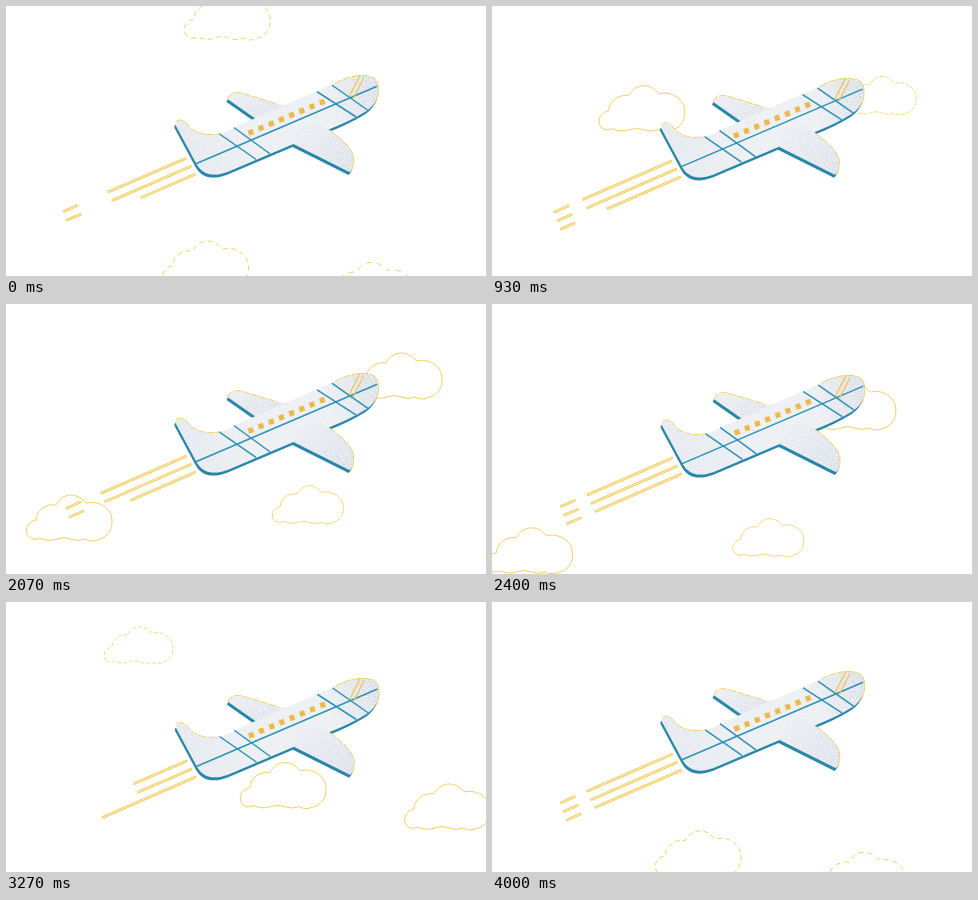
Recreate the animation shown at these times as an HTML page. Size 480 px wide and 270 px high, loop 4.07 s.

```html
<!DOCTYPE html>
<html lang="en">
<head>
<meta charset="utf-8">
<title>Plane among clouds</title>
<style>
  html, body { margin: 0; width: 100%; height: 100%; overflow: hidden; background: #fff; }
  svg { display: block; width: 100vw; height: 100vh; }
  path { stroke-linecap: round; stroke-linejoin: round; }
  #clouds path { fill: #fff; stroke: #f4cf62; stroke-linecap: butt; }
  #trail { fill: none; stroke: #f2ca58; stroke-width: 2.7; }
  #glint { fill: none; stroke: #fdf0c4; stroke-width: 1; }
  .edge { fill: #2a86a8; }
  .skin { fill: #f0f2f5; }
  .rim { fill: none; stroke: #f2cc63; stroke-width: .9; stroke-dasharray: 7 2; }
  .stripe { fill: none; stroke: #2f92b5; stroke-width: 1.5; }
  .pane { fill: none; stroke: #efc555; stroke-width: 1.3; }
  #windows { fill: #e9bb4b; }
</style>
</head>
<body>
<svg viewBox="0 0 480 270">
  <defs>
    <path id="body" d="M170 119C169 114 177 113 181 117C188 127 198 130 214 128Q222 126 232 120L330 77C348 67 366 68 371 74C376 84 372 98 361 105Q345 115 322 124L288 138L222 166C208 171 197 169 191 158Z"/>
    <path id="wing" d="M288 138Q290 124 306 116Q318 118 324 124Q345 139 348 150C349 158 347 164 344 166Z"/>
    <path id="farWing" d="M222 93C224 87 231 85 239 88L272 98Q278 100 284 98L252 114Z"/>
    <linearGradient id="bodyShade" gradientUnits="userSpaceOnUse" x1="180" y1="160" x2="374" y2="90">
      <stop offset="0" stop-opacity=".5"/>
      <stop offset=".35" stop-opacity=".1"/>
      <stop offset=".75" stop-opacity=".1"/>
      <stop offset="1" stop-opacity=".9"/>
    </linearGradient>
    <linearGradient id="wingShade" x1="0" y1="0" x2="1" y2="1">
      <stop offset="0" stop-opacity=".1"/>
      <stop offset="1" stop-opacity=".9"/>
    </linearGradient>
    <filter id="grain" x="0" y="0" width="1" height="1" color-interpolation-filters="sRGB">
      <feTurbulence type="fractalNoise" baseFrequency=".8" numOctaves="2" seed="4"/>
      <feColorMatrix values="0 0 0 0 .8  0 0 0 0 .83  0 0 0 0 .88  2.4 0 0 0 -.7"/>
      <feComposite in2="SourceGraphic" operator="in"/>
    </filter>
  </defs>

  <g id="clouds"></g>

  <g id="plane">
    <path id="trail"/>
    <path id="glint"/>
    <g class="edge" transform="translate(-1 3)">
      <use href="#farWing"/><use href="#body"/><use href="#wing"/>
    </g>
    <use href="#farWing" class="skin"/>
    <use href="#farWing" fill="url(#wingShade)" filter="url(#grain)"/>
    <use href="#body" class="skin"/>
    <use href="#body" fill="url(#bodyShade)" filter="url(#grain)"/>
    <path class="stripe" d="M191 157.5L371 80.5M214 128L250 153M229 122L264 147.5M312 86L350 110.5M327 79.5L362 104"/>
    <path class="pane" d="M354 70L344 90M358 72L348 92"/>
    <g id="windows"></g>
    <use href="#wing" class="skin"/>
    <use href="#wing" fill="url(#wingShade)" filter="url(#grain)"/>
    <path class="rim" d="M171 115C174 113 179 114 181 117C188 127 198 130 214 128M330 77C348 67 366 68 371 74C375 82 373 94 368 100M222 93C224 87 231 85 239 88L272 98M324 124Q345 139 348 150C349 158 347 164 345 166"/>
  </g>
</svg>
<script>
const LOOP = 4070, FRAMES = 61, FRAME_MS = 200 / 3;
const SLOPE = -.435;
const $ = id => document.getElementById(id);

function add(parent, tag, attrs) {
  const el = document.createElementNS('http://www.w3.org/2000/svg', tag);
  for (const k in attrs) el.setAttribute(k, attrs[k]);
  return parent.appendChild(el);
}

const PUFF = 'M3 43C-2 38 0 28 10 26C10 17 20 9 30 11C34 2 46-3 56 5Q59 8 61 9C72 6 86 14 86 26C87 35 82 43 74 45Q66 49 59 45Q52 48 45 45Q38 42 31 45Q22 48 14 44Q8 47 3 43Z';
const steep = { dx: -5.1, dy: 6.55 }, flat = { dx: -6.45, dy: 6.2 };

// x, y is the place at frame `at`; the outline thins out at both ends of a life
const clouds = [
  { at: 0, x: 178, y: -13, drift: steep, size: 1, born: -12, gone: 60 },
  { at: 0, x: 424, y: -22, drift: steep, size: .83, born: 0, gone: 62 },
  { at: 31, x: 350, y: 48, drift: flat, size: 1, born: 18, gone: 69 },
  { at: 49, x: 398, y: 181, drift: flat, size: 1, born: 42, gone: 63 },
  { at: 49, x: 98, y: 24, drift: flat, size: .8, born: 47, gone: 57 }
];
for (const c of clouds) c.el = add($('clouds'), 'path', { d: PUFF });

function placeCloud(c, frame) {
  // a cloud that outlives the loop carries on past its seam
  const f = frame + FRAMES < c.gone ? frame + FRAMES : frame;
  const life = (f - c.born) / (c.gone - c.born);
  const ink = life > 0 && life < 1 ? Math.min(1, 1.4 * Math.sin(Math.PI * life)) : 0;
  const x = c.x + c.drift.dx * (f - c.at), y = c.y + c.drift.dy * (f - c.at);
  c.el.setAttribute('transform', `translate(${x} ${y}) scale(${c.size})`);
  c.el.setAttribute('stroke-dasharray', ink < 1 ? `5 ${1 + 8 * (1 - ink)}` : 'none');
  c.el.setAttribute('visibility', ink > 0 ? 'visible' : 'hidden');
}

for (let k = 0; k < 8; k++) {
  const x = 245.3 + 10.2 * k, y = 126.3 - 4.3 * k;
  add($('windows'), 'rect', { x: -2.6, y: -2.7, width: 5.2, height: 5.4, transform: `translate(${x} ${y}) rotate(-18)` });
}

// Each streak is longest at its peak beat and sheds a dash from beat 4 until `until`
const BEATS = 8;
const streaks = [
  { x: 180, y: 152.4, reach: 92, peak: 5.5, pull: 1.8, until: 8 },
  { x: 185, y: 160.4, reach: 96, peak: 5.5, pull: 1.8, until: 8 },
  { x: 189, y: 168.4, reach: 97, peak: 1, pull: .8, until: 6 }
];

function trailPath(frame) {
  const beat = (frame + BEATS - 1) % BEATS + 1;
  let d = '';
  streaks.forEach((s, n) => {
    const span = (from, to) => {
      const point = x => `${x} ${s.y + SLOPE * (x - s.x)}`;
      d += `M${point(from)}L${point(to)}`;
    };
    span(s.reach + s.pull * (beat - s.peak) ** 2, s.x);
    if (beat >= 4 && beat <= s.until) {
      const x = 81 - 2.8 * beat + 3 * n;
      span(x, x + 13);
    }
  });
  return d;
}

function draw(now) {
  // frame starts fall on whole hundredths of a second
  const frame = Math.min(FRAMES - 1, Math.floor((now % LOOP + 3.4) / FRAME_MS));
  for (const c of clouds) placeCloud(c, frame);

  // two dips per loop, the second one deeper
  const s = Math.sin(2 * Math.PI * frame / FRAMES);
  const bob = s * s * (5.3 - 2.4 * s);
  $('plane').setAttribute('transform', `translate(${-.5 - .5 * s} ${bob})`);

  const d = trailPath(frame);
  $('trail').setAttribute('d', d);
  $('glint').setAttribute('d', d);
}

const start = performance.now();
function tick() {
  draw(performance.now() - start);
  requestAnimationFrame(tick);
}
tick();
</script>
</body>
</html>
```
